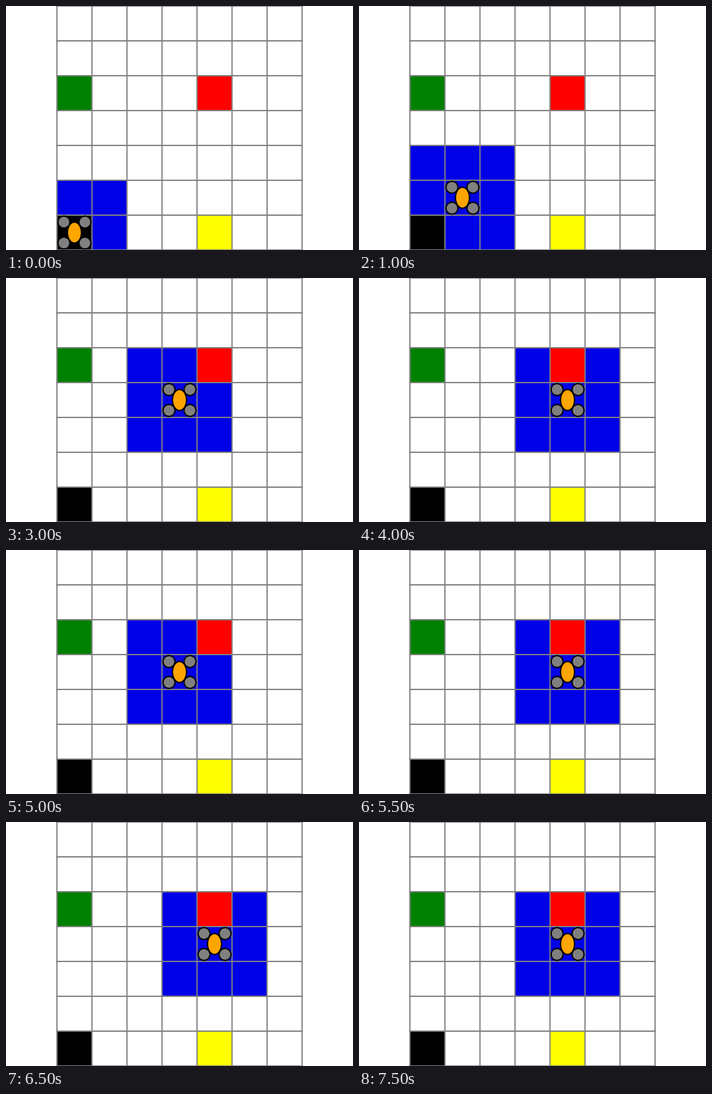
Animation, 535 px wide and 378 px high, one loop 8000 ms. Source, as a matplotlib script:

```python
import matplotlib.pyplot as plt
from matplotlib.animation import FuncAnimation
from matplotlib.patches import Circle, Ellipse, Rectangle

WIDTH, HEIGHT, DPI = 535, 378, 100
CELL, COUNT, LEFT = 54, 7, 78.5
STROKE = 2 * 72 / DPI

# Drone cell (column, row from the bottom), one entry per half second.
PATH = [(0, 0), (0, 1), (1, 1), (2, 1), (2, 2), (3, 2), (3, 3), (3, 3)]
PATH += [(4, 3), (4, 3)] + [(3, 3), (4, 3)] * 3

VIEW = "#0000e6"
LANDMARKS = {(0, 0): "black", (0, 4): "green", (4, 4): "red", (4, 0): "yellow"}

fig = plt.figure(figsize=(WIDTH / DPI, HEIGHT / DPI), dpi=DPI, facecolor="white")
ax = fig.add_axes([0, 0, 1, 1])
ax.set(xlim=(0, WIDTH), ylim=(0, HEIGHT))
ax.axis("off")


def corner(col, row):
    return LEFT + col * CELL, row * CELL


cells = {}
for col in range(COUNT):
    for row in range(COUNT):
        cells[col, row] = ax.add_patch(
            Rectangle(corner(col, row), CELL, CELL, lw=0, fc="white", zorder=1))

line_style = dict(color="gray", lw=STROKE, snap=False, zorder=2)
right = LEFT + COUNT * CELL
for i in range(COUNT + 1):
    x, y = corner(i, i)
    ax.plot([x, x], [0, HEIGHT], **line_style)
    ax.plot([LEFT - 1, right + 1], [y, y], solid_capstyle="butt", **line_style)

OFFSETS = [(dx * 0.3 * CELL, dy * 0.3 * CELL) for dx in (-1, 1) for dy in (-1, 1)]
outline = dict(ec="black", lw=STROKE)
rotors = [ax.add_patch(Circle((0, 0), 0.17 * CELL, fc="gray", zorder=3, **outline))
          for _ in OFFSETS]
body = ax.add_patch(
    Ellipse((0, 0), 0.4 * CELL, 0.6 * CELL, fc="orange", zorder=4, **outline))


def update(step):
    col, row = PATH[step]
    for (c, r), patch in cells.items():
        seen = abs(c - col) <= 1 and abs(r - row) <= 1
        patch.set_facecolor(LANDMARKS.get((c, r), VIEW if seen else "white"))
    x, y = corner(col + 0.5, row + 0.5)
    body.set_center((x, y))
    for rotor, (dx, dy) in zip(rotors, OFFSETS):
        rotor.set_center((x + dx, y + dy))
    return [*cells.values(), *rotors, body]


anim = FuncAnimation(fig, update, frames=len(PATH), interval=500,
                     repeat=True, repeat_delay=0, blit=False)
plt.show()
```
